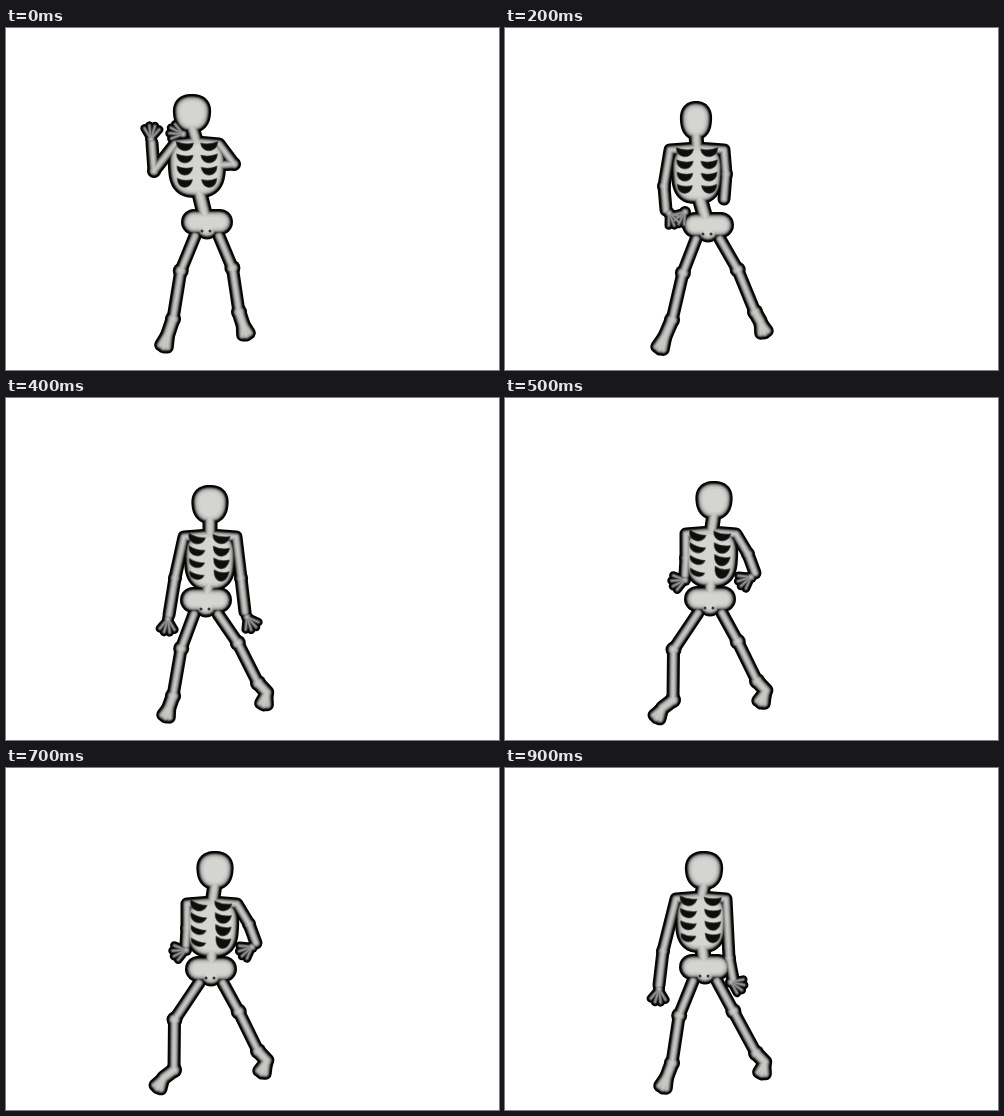
Write an HTML page with a canvas that moves like this. It is 493 px wide and 342 px high and loops after 1 s.

```html
<!DOCTYPE html>
<html lang="en">
<head>
<meta charset="utf-8">
<title>Dancing skeleton</title>
<style>
html, body { margin: 0; width: 100%; height: 100%; overflow: hidden; background: #fff; }
canvas { display: block; width: 493px; height: 342px; }
</style>
</head>
<body>
<canvas id="stage" width="493" height="342"></canvas>
<script>
const ctx = document.getElementById('stage').getContext('2d');
const STEP = 100;
const TORSO = 53;

// head: x, y, radius; chest: half width, shoulder span, turn
// hand: x, y, direction in degrees; bow: sideways bulge of knee and heel
const limb = (elbow, wrist, hand, ankle, toe, bow) => ({ elbow, wrist, hand, ankle, toe, bow });

const clap = {
  head: [186, 86, 19], neck: [191, 108], chest: [21, 22, 0], pelvis: [201, 196],
  L: limb([148, 143], [146, 115], [145, 111, -85], [167, 291], [158, 318], [-5, 0]),
  R: limb([228, 136], [212, 137], [177, 106, -165], [233, 284], [240, 306], [5, 0])
};
const fold = {
  head: [191, 93, 16], neck: [192, 114], chest: [18, 27, 0], pelvis: [203, 199],
  L: limb([159, 158], [161, 182], [164, 185, 55], [167, 292], [155, 320], [-3, 0]),
  R: limb([221, 146], [219, 171], [180, 184, 130], [250, 284], [259, 304], [3, 1])
};
const swing = {
  head: [199, 103, 19], neck: [196, 123], chest: [18, 25, .1], pelvis: [200, 201],
  L: limb([158, 183], [154, 217], [154, 221, 95], [167, 295], [158, 319], [-5, 0]),
  R: limb([224, 190], [228, 211], [226, 214, 25], [251, 285], [257, 305], [0, 6])
};
const drop = {
  head: [204, 107, 18.5], neck: [204, 131], chest: [18, 26, .2], pelvis: [200, 204],
  L: limb([169, 180], [163, 217], [162, 221, 95], [167, 298], [160, 318], [-4, 0]),
  R: limb([235, 180], [239, 214], [241, 219, 60], [252, 285], [258, 306], [3, 6])
};
const strut = {
  head: [209, 103, 18.5], neck: [206, 128], chest: [19, 25, .25], pelvis: [205, 203],
  L: limb([181, 160], [180, 177], [180, 182, 165], [168, 302], [152, 319], [-14, -3]),
  R: limb([243, 156], [250, 175], [246, 179, 150], [252, 283], [256, 304], [1, 7])
};

function mix(a, b, k) {
  if (typeof a === 'number') return a + (b - a) * k;
  if (Array.isArray(a)) return a.map((v, i) => mix(v, b[i], k));
  return Object.fromEntries(Object.keys(a).map(key => [key, mix(a[key], b[key], k)]));
}

const beats = [clap, mix(clap, fold, .5), fold, swing, drop,
               strut, mix(drop, strut, 1.12), strut, drop, swing];

// Inset of each tone from the black rim, with its colour
const tones = [[0, '#050505'], [4, '#2c2c2c'], [5.5, '#606060'], [7, '#929290'],
               [9, '#b4b4b1'], [11.5, '#c8c8c4'], [15, '#d4d4d0']];

const shift = ([x, y], dx, dy) => [x + dx, y + dy];

function line(...points) {
  const path = new Path2D();
  points.forEach(p => path.lineTo(p[0], p[1]));
  return path;
}

const dot = p => line(p, shift(p, .01, 0));

// Point at share k from a to b, pushed sideways
const bent = (a, b, k, push) => shift(mix(a, b, k), push, 0);

// Rounded box; taper narrows its lower end
function oval(x, y, rx, ry, power, taper) {
  const path = new Path2D();
  const soft = v => Math.sign(v) * Math.abs(v) ** (2 / power);
  for (let a = 0; a < 6.28; a += .1) {
    const v = soft(Math.sin(a));
    path.lineTo(x + rx * soft(Math.cos(a)) * (1 - taper * v), y + ry * v);
  }
  path.closePath();
  return path;
}

function bones(pose) {
  const { head, neck, pelvis, chest: [half, span] } = pose;
  const list = [];
  const add = (path, width, solid) => list.push({ path, width, solid });

  add(oval(head[0], head[1] - .5, head[2] - 8, 11.5, 2.5, .1), 16, true);
  add(line(shift(head, 0, 13), shift(neck, 0, 8)), 15);
  add(oval(neck[0], neck[1] + 5 + TORSO / 2, half, TORSO / 2 - 4, 3, .06), 16, true);
  add(line(shift(neck, 0, TORSO - 6), pelvis), 16);
  add(line(shift(pelvis, -13, -2), shift(pelvis, 13, -2)), 26);
  add(dot(shift(pelvis, 0, 3)), 25);

  for (const [arm, side] of [[pose.L, -1], [pose.R, 1]]) {
    const { elbow, wrist, hand, ankle, toe, bow } = arm;
    const shoulder = shift(neck, side * span, 8);
    add(line(shift(neck, 0, 6), shoulder, elbow, wrist), 13);
    add(dot(elbow), 14);

    add(dot(hand), 12);
    for (let i = -1.5; i < 2; i++) {
      const a = hand[2] * Math.PI / 180 + i * .42;
      const reach = 14 - Math.abs(i);
      add(line(hand, shift(hand, Math.cos(a) * reach, Math.sin(a) * reach)), 8.5);
    }

    const hip = shift(pelvis, side * 12, 12);
    const knee = bent(hip, ankle, .42, bow[0]);
    const heel = bent(ankle, toe, .45, bow[1]);
    add(line(hip, knee, ankle), 13);
    add(dot(knee), 16);
    add(dot(ankle), 16);
    add(line(ankle, heel, toe), 15);
    const tilt = Math.atan2(toe[1] - heel[1], toe[0] - heel[0]);
    for (const s of [-3.5, 3.5]) {
      add(line(heel, shift(toe, -Math.sin(tilt) * s, Math.cos(tilt) * s)), 13);
    }
  }
  return list;
}

function ribGap(x, y, w, h, tilt) {
  ctx.save();
  ctx.translate(x, y);
  ctx.rotate(tilt);
  ctx.beginPath();
  ctx.moveTo(-w / 2, -h / 2);
  ctx.quadraticCurveTo(0, -h * .2, w / 2, -h / 2);
  ctx.bezierCurveTo(w * .45, h * .7, -w * .45, h * .7, -w / 2, -h / 2);
  ctx.fill();
  ctx.stroke();
  ctx.restore();
}

function draw(pose) {
  ctx.filter = 'none';
  ctx.fillStyle = '#fff';
  ctx.fillRect(0, 0, 493, 342);
  ctx.lineCap = ctx.lineJoin = 'round';
  const parts = bones(pose);
  for (const [inset, tone] of tones) {
    ctx.filter = inset ? 'blur(.7px)' : 'blur(.3px)';
    ctx.fillStyle = ctx.strokeStyle = tone;
    for (const { path, width, solid } of parts) {
      if (solid) ctx.fill(path);
      if (width - inset > .8) {
        ctx.lineWidth = width - inset;
        ctx.stroke(path);
      }
    }
  }

  const { neck, pelvis, chest: [, , turn] } = pose;
  ctx.filter = 'blur(.6px)';
  ctx.fillStyle = '#0c0f0c';
  ctx.strokeStyle = 'rgba(40,40,40,.55)';
  ctx.lineWidth = 1.4;
  for (let row = 0; row < 4; row++) {
    for (const side of [-1, 1]) {
      ribGap(neck[0] - turn * 8 + side * 12.5, neck[1] + 11 + row * 12.2,
             17 - row * .7, 9 + turn * row * side * 4, turn - side * .08);
    }
  }

  ctx.strokeStyle = '#333';
  ctx.lineWidth = 3;
  for (const side of [-4, 4]) ctx.stroke(dot(shift(pelvis, side - 1, 7)));
}

let shown = -1;
const start = performance.now();
function tick() {
  const beat = Math.floor((performance.now() - start) / STEP) % beats.length;
  if (beat !== shown) draw(beats[shown = beat]);
  requestAnimationFrame(tick);
}
tick();
</script>
</body>
</html>
```
